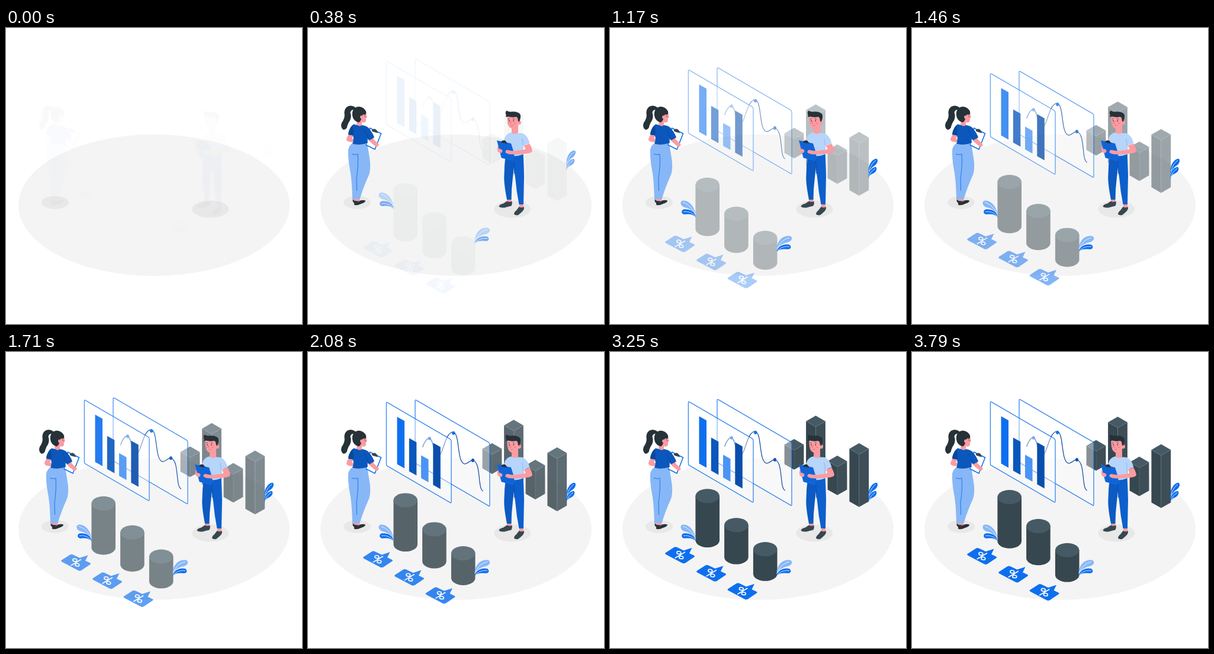
An HTML page with a canvas for the animation above (3830 ms loop, 500 px wide and 500 px high).

```html
<!DOCTYPE html>
<html lang="en">
<head>
<meta charset="utf-8">
<title>Business statistics</title>
<style>
html, body { margin: 0; width: 100%; height: 100%; overflow: hidden; background: #fff; }
canvas { display: block; width: 500px; height: 500px; }
</style>
</head>
<body>
<canvas id="stage" width="500" height="500"></canvas>
<script>
const stage = document.getElementById('stage').getContext('2d');
const layer = document.createElement('canvas');
layer.width = layer.height = 500;
const g = layer.getContext('2d');

const LOOP = 3830, LEAD = 40, SLOPE = 0.577;
const BLUE = '#0e6fee', NAVY = '#0b57bb', PALE = '#87b7f7', SKY = '#b7d4fa';
const SKIN = '#fa9ca2', INK = '#263238', SLATE = '#37474f', STEEL = '#455a64';

// Cubic bezier (.36, -.01, .5, 1.38), solved for time by bisection.
function ease(x) {
  if (x <= 0) return 0;
  if (x >= 1) return 1;
  const curve = (s, a, b) => 3 * (1 - s) ** 2 * s * a + 3 * (1 - s) * s * s * b + s ** 3;
  let lo = 0, hi = 1;
  for (let i = 0; i < 24; i++) {
    const mid = (lo + hi) / 2;
    if (curve(mid, 0.36, 0.5) < x) lo = mid; else hi = mid;
  }
  return curve(lo, -0.01, 1.38);
}

function fill(d, color) {
  g.fillStyle = color;
  g.fill(new Path2D(d));
}

function line(d, color, width = 1) {
  g.strokeStyle = color;
  g.lineWidth = width;
  g.stroke(new Path2D(d));
}

function oval(x, y, rx, ry, color, ctx = g, tilt = 0) {
  ctx.fillStyle = color;
  ctx.beginPath();
  ctx.ellipse(x, y, rx, ry, tilt, 0, Math.PI * 2);
  ctx.fill();
}

function drawBox(x, top, height) {
  const w = 16.4, h = 9.4, l = x - w, r = x + w, y = top + h, m = top + 2 * h;
  fill(`M${l} ${y}L${x} ${m}V${m + height}L${l} ${y + height}Z`, SLATE);
  fill(`M${r} ${y}L${x} ${m}V${m + height}L${r} ${y + height}Z`, '#3d4e57');
  fill(`M${x} ${top}L${r} ${y}L${x} ${m}L${l} ${y}Z`, STEEL);
  line(`M${l} ${y}L${x} ${m}L${r} ${y}M${x} ${m}V${m + height}`, '#687980', 0.5);
}

function drawBoxes() {
  drawBox(311, 149, 33);
  drawBox(347.5, 109.5, 94);
  drawBox(384, 177, 48);
  drawBox(420.8, 156, 89);
}

function drawPanel(x, y, w, h) {
  const r = x + w, d = w * SLOPE;
  const path = `M${x} ${y + 2}Q${x} ${y - 1} ${x + 2.5} ${y + 1}L${r - 2} ${y + d - 1}` +
    `Q${r} ${y + d} ${r} ${y + d + 3}V${y + d + h - 2}Q${r} ${y + d + h + 1} ${r - 2.5} ${y + d + h - 1}` +
    `L${x + 2} ${y + h + 1}Q${x} ${y + h} ${x} ${y + h - 2}Z`;
  fill(path, 'rgba(255,255,255,.4)');
  line(path, BLUE, 1.1);
}

function drawBar(x, top, height, color) {
  const w = 12.5, d = 7;
  fill(`M${x} ${top}l${w} ${d}v${height}l${-w} ${-d}Z`, color);
}

function drawPanels() {
  drawPanel(181, 79.8, 126, 107);
  line('M193.5 160C196 152 201 144 205 145C213 146 211 174 219 175C229 175 230 136 245 134' +
    'C257 136 251 184 264 188C271 188 273 181 279 182C293 187 286 231 296 234', '#0a469c', 1.2);
  oval(205.3, 145, 2.6, 2.8, BLUE);
  oval(245.7, 136, 2.6, 2.9, BLUE);
  oval(278.5, 182, 2.6, 2.9, NAVY);
  drawPanel(132.3, 83.8, 109.7, 107);
  drawBar(150.5, 108.5, 80, BLUE);
  drawBar(170.8, 144.5, 56, NAVY);
  drawBar(191, 173.5, 38.5, '#4b94f5');
  drawBar(211.3, 152.5, 71, '#0a4eac');
}

function drawCylinder(x, top, bottom) {
  const rx = 20.3, ry = 12;
  fill(`M${x - rx} ${top}V${bottom}A${rx} ${ry} 0 0 0 ${x + rx} ${bottom}V${top}Z`, SLATE);
  oval(x, top, rx, ry, STEEL);
}

function drawLabel(dx, dy) {
  g.save();
  g.translate(dx, dy);
  fill('M94 341L108 332Q110.500 330.500 113 331.800L124.500 337.300L138.500 332.800L134 342L142 345.800' +
    'Q144 347 142 348.400L127.500 358.200Q125 359.700 122 358.500L94.500 344Q92 342.700 94 341Z', BLUE);
  g.lineCap = 'round';
  line('M110.300 349.800L126.300 340.200', '#fff', 1.7);
  g.lineWidth = 1.6;
  for (const [x, y] of [[116.3, 341], [120.3, 349]]) {
    g.beginPath();
    g.ellipse(x, y, 3.5, 2.3, 0.15, 0, Math.PI * 2);
    g.stroke();
  }
  g.restore();
}

function drawCylinders() {
  drawCylinder(164.7, 245.3, 320);
  drawCylinder(213.4, 294.3, 348.5);
  drawCylinder(262.2, 335, 376.8);
  drawLabel(0, 0);
  drawLabel(53, 30.5);
  drawLabel(105.5, 61);
}

function drawPlants() {
  fill('M145 318C144 304 135 291 123 291.500C117 293 119 301 126 303C136 305 140 309 145 318Z', PALE);
  line('M123 294.500C132 297 140 305 144 315', '#fff', 0.8);
  fill('M145 319.500C143 309 133 305 124 306.500C119 309 121 315 126 314.800C134 314 139 314 145 319.500Z', BLUE);
  line('M124 310.500C133 309 140 313 144 318', '#fff', 0.8);

  fill('M281.500 376C281 362 290 350 303 351.300C310 353 308 360 300 362C290 364 285 368 281.500 376Z', PALE);
  line('M303 354.500C294 356 286 363 282.500 373', '#fff', 0.8);
  fill('M281.500 377.500C284 368 294 364 303 366C307 369 306 374 300 373.800C292 373 287 373 281.500 377.500Z', BLUE);
  line('M303 369.500C295 368 288 371 283 376', '#fff', 0.8);

  fill('M436.700 246C435 234 442 221 450 220.700C454 222 452 229 447 232.500C441 236 439 240 436.700 246Z', BLUE);
  line('M449 223.500C443 228 439 235 437.500 242', '#fff', 0.8);
  fill('M436.500 254.500C436 243 442 235 449 234.800C452 237 450 243 445 245.500C440 247 438 250 436.500 254.500Z', BLUE);
  line('M448 237.500C442 241 439 246 437.500 252', '#fff', 0.8);
}

function drawWoman() {
  // feet
  fill('M75.500 286H82.500L83.500 293L76 292Z', SKIN);
  fill('M80 287H87L88 294L80 296Z', SKIN);
  fill('M75.500 289.500L79 292L86 292.500Q82 296 77 295Q75 293 75.500 289.500Z', INK);
  fill('M78.500 294.500Q82 296 88 291.500Q93 290 97 291.500Q97 294.500 91 296.500Q84 300 78.500 299Q77 297 78.500 294.500Z', INK);
  // trousers
  fill('M76 194.500L100 193.500Q102 207 104.800 225Q106 240 103 248Q93 270 87.500 289H75Q74 255 71 240Q67 218 68 205Q70 197 76 194.500Z', PALE);
  line('M74 213Q80 215 85 213M84 214Q85.500 230 82 254L82.500 275', BLUE, 0.9);
  // clipboard
  fill('M104 168.500L123.800 178L113 205.500L97 197Z', '#fff');
  line('M104.500 169L123.500 178.300L113 205L98 197.500Z', BLUE, 1.6);
  fill('M107.500 172.500Q109 170 113 170.500Q117 172 118 177.500L109 175Z', SLATE);
  // arms
  fill('M69 179L78 181L74 186L79 190L75 193Q67 192.500 65 189.500Q64.500 186 69 179Z', SKIN);
  fill('M102 189L109 185Q112 190 119 195.500Q120.500 199 117 200.500Q113 200 111 197.500Q105 193 102 189Z', SKIN);
  // top
  fill('M77 162.500Q84 165 91 164Q99 165 102 168.500Q109 176 112 185L103.500 189.800L99.500 186L101 194Q88 199 75 195.500Q78 188 76 181.500L68 180Q70 168 77 162.500Z', NAVY);
  line('M95 171Q99 179 103 188', '#0a489a', 0.8);
  fill('M75 164Q68 172 68 180L76 181.500Q78 173 75 164Z', '#0a489a');
  // head
  fill('M83 154L91 156V164Q87 168 82 163Z', SKIN);
  fill('M89 140H97.500Q99 147 99.800 151L97.800 152.500Q99 159 94.500 159.800Q90 160 87 157Z', SKIN);
  fill('M80 134Q73 129 66 133Q60 138 61.800 147Q62 153 57 160Q54 168 60 172Q66 171 66.500 165Q68 160 71 156Q74 149 71.500 143Q72 138 78 138Z', INK);
  fill('M75 142Q77 133 86 132.700Q94 133 98 141Q99 146 96 146.500Q92 145 91 149Q90 157 86 159.500Q80 159 76 152Q74 147 75 142Z', INK);
  oval(90.2, 150.5, 2.1, 2.8, SKIN);
  line('M94.500 148.500l1.800 -.5M97 149.500v1.300', INK, 0.8);
}

function drawMan() {
  // feet
  fill('M336 287H343.500V296H336Z', SKIN);
  fill('M357 294H364V305H357Z', SKIN);
  fill('M336 292.500Q340 295 344.500 292.500Q345.500 297 343.500 300.500Q337 302 332 303.500Q325 304 322.500 301.500Q323 298 330 296.500Z', SLATE);
  fill('M356.500 302Q361 304.500 365 302Q365.500 306 363 309Q358 314 355 316Q350 317 348 314.500Q348 311 352 308Z', SLATE);
  // trousers
  fill('M334 213L350 216Q348 235 346 252Q343.500 272 343.500 290H336Q331 264 331.300 252Q331.500 232 334 213Z', '#0c5ac2');
  fill('M345 215L363.500 211Q364.500 227 365 250L364 298H356.500Q352 276 350 252Q347 234 345 215Z', '#0d5fcd');
  line('M347.500 222Q349 236 348.500 246', '#0a489a', 0.8);
  // shirt and neck
  fill('M343 176.500Q336 178 333 184Q329 193 330 200L335 215Q350 219 364 213L363.500 198.500L374.500 195Q372 183 363 178Z', SKY);
  fill('M344 167L355 164V177Q350 180.500 344 177Z', SKIN);
  line('M363.500 199Q363 191 361.500 187', PALE, 0.9);
  // left arm, clipboard, right arm
  fill('M329 197L322 198Q318 203 321 208.500Q324 212 330 210Z', SKIN);
  fill('M319.500 190L343 195Q347.500 207 349.500 220.500L346 224.500L327 219Z', '#1064d6');
  line('M319.500 190L327 219L347 224', BLUE, 1);
  fill('M326 192Q329 189 333 190L337 195L328 194Z', INK);
  oval(324.5, 207.5, 4, 3.2, SKIN, g, 0.3);
  fill('M364.500 198.500L374.500 195.500Q378 202 379 207Q378.500 210.500 373 211.500Q358 213.500 347 213.500Q338 214 333.500 210.500Q333 206 337 206Q342 207 346 207.500Q359 207 368 204.500Z', SKIN);
  // head
  fill('M336.500 148Q336 159 338.500 165Q341 170 346 170Q353 169 355.500 163Q360 164 360 159.500Q360 156.500 357 156L356 147Z', SKIN);
  fill('M333.500 150Q335.500 149 334 145Q333 141 336 139.500Q338 142 343 141.500Q351 140.500 355 143Q360 145 359 151Q358.500 155 356.500 159L354.500 156Q355 151 351.500 150Q344 151.500 338 149.500Q335.500 150.500 333.500 150Z', INK);
  oval(340, 156.8, 0.8, 1.1, INK);
  oval(347.2, 156.8, 0.8, 1.1, INK);
  line('M338 154l2.500 -.8M346 153.300l3 .8', INK, 0.8);
  line('M343 157l-1.300 4l1.500 .3M342 164.500q2.500 1 4.500 -.6', '#d65e6a', 0.7);
  oval(339, 161, 1.5, 1.2, '#f6838c');
  oval(349.5, 161, 1.8, 1.3, '#f6838c');
}

const groups = [
  { draw: drawBoxes, time: 3870, from: 30 },
  { draw: drawPanels, time: 2930, from: -30 },
  { draw: drawCylinders, time: 3870, from: 30 },
  { draw: drawPlants, time: 1050, from: -30 },
  { draw: () => { drawWoman(); drawMan(); }, time: 480, from: 0 }
];

function drawGroup({ draw, time, from }, now) {
  const p = ease(now / time);
  g.clearRect(0, 0, 500, 500);
  g.save();
  g.lineJoin = 'round';
  g.translate(0, from * (1 - p));
  draw();
  g.restore();
  stage.globalAlpha = Math.max(0, Math.min(1, p));
  stage.drawImage(layer, 0, 0);
  stage.globalAlpha = 1;
}

function render() {
  const now = performance.now() % LOOP + LEAD;
  stage.fillStyle = '#fff';
  stage.fillRect(0, 0, 500, 500);
  oval(250, 299.3, 229, 119.5, '#f4f4f4', stage);
  oval(83, 294.8, 23, 11, '#e8e8e8', stage);
  oval(345.3, 306, 31, 14.5, '#e8e8e8', stage);
  for (const group of groups) drawGroup(group, now);
  requestAnimationFrame(render);
}
render();
</script>
</body>
</html>
```
